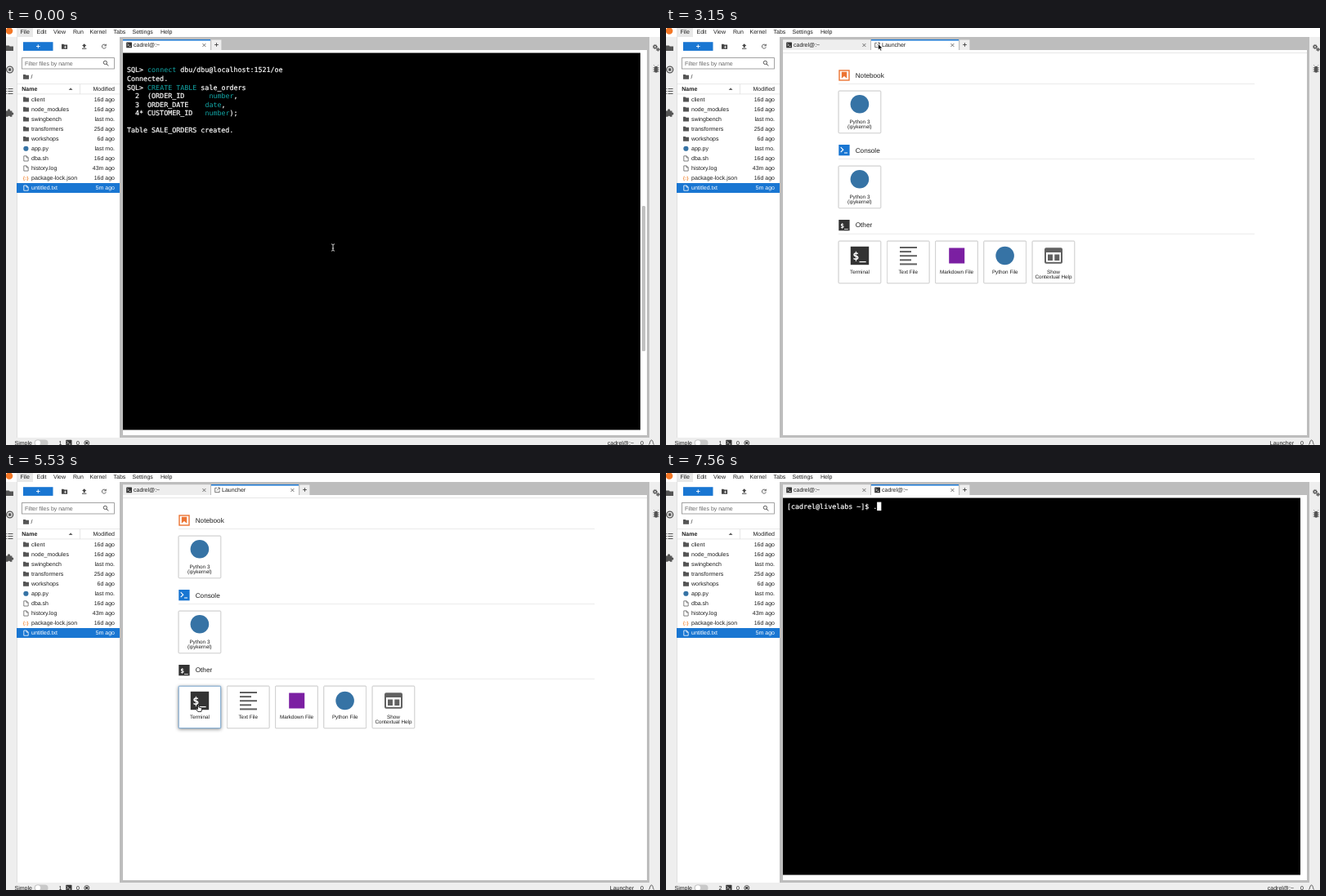
Write an HTML page that moves like this. It is 800x511 px and loops after 8000 ms.

```html
<!DOCTYPE html>
<html lang="en">
<head>
<meta charset="utf-8">
<title>Notebook workspace</title>
<style>
  html, body { margin: 0; width: 100%; height: 100%; overflow: hidden; background: #fff; }
  svg { display: block; width: 100vw; height: 100vh; }
  text { font: 7px "Liberation Sans", Arial, sans-serif; fill: #1c1c1c; white-space: pre; text-rendering: geometricPrecision; }
  .bold { font-weight: bold; }
  .end { text-anchor: end; }
  .mid { text-anchor: middle; }
  .head { font-size: 8.2px; }
  .label { font-size: 6.35px; text-anchor: middle; }
  .light { fill: #fff; }
  .hint { fill: #666; }
  .mono { font: 8.34px "DejaVu Sans Mono", monospace; fill: #fff; stroke: #fff; stroke-width: .2px; }
  .teal { fill: #12a5a5; stroke: none; }
  .glyph { font: bold 8px "DejaVu Sans Mono", monospace; fill: #fff; text-anchor: middle; }
  .line { fill: none; stroke: #555; stroke-width: 1; }
  .card { fill: #fff; stroke: #d4d4d4; stroke-width: .8; filter: drop-shadow(0 .7px .7px #0005); }
  .card.hover { stroke: #5a93c8; filter: drop-shadow(0 1.5px 2px #0007); }
</style>
</head>
<body>
<svg id="stage" viewBox="0 0 800 511" preserveAspectRatio="none"></svg>
<script>
const LOOP = 8000, TICK = 70;
const BLUE = '#1976d2', DARK = '#333', GREY = '#616161', DOCK = '#bdbdbd', PANEL = '#eee';
const USER = 'cadrel';
const COL = 5.02, ROW = 10.57;

const rect = (x, y, w, h, fill, more = '') => `<rect x="${x}" y="${y}" width="${w}" height="${h}" fill="${fill}" ${more}/>`;
const dot = (x, y, r, fill, more = '') => `<circle cx="${x}" cy="${y}" r="${r}" fill="${fill}" ${more}/>`;
const text = (x, y, s, cls = '', id = '') => `<text x="${x}" y="${y}" class="${cls}" id="${id}">${s}</text>`;
const path = (d, fill = GREY, more = '') => `<path d="${d}" fill="${fill}" ${more}/>`;
const line = (d, more = '') => `<path d="${d}" class="line" ${more}/>`;
const group = (id, body) => `<g id="${id}">${body}</g>`;
const mono = (col, row, s, cls = '') => text(148 + col * COL, 43.9 + row * ROW, s, 'mono ' + cls);

const folder = (x, y) => path(`M${x} ${y - 2.8}h2.7l.9.9h3.4v4.9h-7z`, '#555');
const page = (x, y, stroke) => line(`M${x} ${y - 3}h3.4l2 2v4.2h-5.4zM${x + 3.3} ${y - 3}v2.1h2.1`, `style="stroke:${stroke};stroke-width:.8"`);
const prompt = (x, y, s) => rect(x, y, s, s, DARK, 'rx=".6"') +
  line(`M${x + s * .2} ${y + s * .25}l${s * .22} ${s * .22}l${-s * .22} ${s * .22}M${x + s * .5} ${y + s * .72}h${s * .3}`, 'style="stroke:#fff;stroke-width:.8"');
const cross = (x, y) => line(`M${x - 2} ${y - 2}l4 4m0-4l-4 4`, 'style="stroke-width:.8"');
const plus = (x, y, stroke = '#444') => line(`M${x - 2.3} ${y}h4.6M${x} ${y - 2.3}v4.6`, `style="stroke:${stroke};stroke-width:.9"`);

function menuBar() {
  const items = [[17.5, 'File'], [37.5, 'Edit'], [58, 'View'], [82, 'Run'], [102.5, 'Kernel'], [131.5, 'Tabs'], [154.5, 'Settings'], [189, 'Help']];
  return dot(4, 3.5, 4.3, '#f37726') + rect(13, 0, 20, 11, '#e8e8e8') + items.map(([x, s]) => text(x, 7, s)).join('');
}

function sideBars() {
  const gear = (x, y, r) => dot(x, y, r, 'none', 'stroke="#555" stroke-width="1.3"') +
    dot(x, y, r + 1, 'none', 'stroke="#555" stroke-width="1" stroke-dasharray="1 1.1"');
  return rect(0, 11, 13, 500, PANEL) + rect(13, 11, .6, 491, '#ccc') + rect(787, 11, 13, 500, PANEL) +
    path('M0 21.5h3.7l1 1.1h4.3v5.4h-9z', '#555') +
    dot(4.7, 51, 3.9, 'none', 'stroke="#555" stroke-width="1.4"') + rect(3, 49.3, 3.4, 3.4, '#555') +
    line('M2.5 74.5h6M2.5 77.5h6M2.5 80.5h6M.3 74.5h1M.3 77.5h1M.3 80.5h1') +
    path('M0 101.5h2a1.6 1.6 0 1 1 3 0h2.4v2.1a1.5 1.5 0 1 1 0 2.9v2.3h-2.3a1.5 1.5 0 0 0-2.9 0h-2.2z', '#555') +
    gear(794, 23, 1.6) + gear(797.5, 26.3, 1) +
    path('M793 49a2.2 2.2 0 0 1 4.4 0v3.5a2.2 2.2 0 0 1-4.4 0z', '#555') +
    line('M791.6 48.7h7.2M791.6 51h7.2M791.6 53.3h7.2M793.4 46.4l-1-1M797 46.4l1-1', 'style="stroke-width:.8"');
}

function fileBrowser() {
  const files = [
    ['client', '16d ago'], ['node_modules', '16d ago'], ['swingbench', 'last mo.'], ['transformers', '25d ago'], ['workshops', '6d ago'],
    ['app.py', 'last mo.'], ['dba.sh', '16d ago'], ['history.log', '43m ago'], ['package-lock.json', '16d ago'], ['untitled.txt', '5m ago']
  ];
  const rows = files.map(([name, age], i) => {
    const y = 87.4 + i * 12.07, on = i === files.length - 1, cls = on ? 'light' : '';
    const icon = !name.includes('.') ? folder(21, y)
      : name.endsWith('.py') ? dot(24.4, y, 3.1, '#3673a5')
      : name.endsWith('.json') ? `<text x="20.8" y="${y + 2}" class="bold" style="font-size:6px;fill:#f08a3c">{:}</text>`
      : page(21.8, y, on ? '#fff' : GREY);
    return (on ? rect(13, y - 6, 126, 12, BLUE) : '') + icon + text(31, y + 2.4, name, cls) + text(133, y + 2.4, age, 'end ' + cls);
  }).join('');
  return rect(21, 17.2, 36.5, 10.7, BLUE) + plus(39.3, 22.5, '#fff') +
    path('M68 19.7h2.6l.9.9h3.6v5.2h-7.1z', '#444') + line('M71 23.3h3M72.5 21.8v3', 'style="stroke:#fff;stroke-width:.7"') +
    path('M95.7 19.2l2.7 2.8h-1.7v2h-2v-2h-1.7zM93 24.8h5.4v1h-5.4z', '#444') +
    line('M122 21.2a2.5 2.5 0 1 0 .3 2.2M122.4 19.7v2.1h-2.1', 'style="stroke-width:.9"') +
    rect(19.4, 36.6, 113, 13.4, '#fff', 'stroke="#8c8c8c" stroke-width=".8"') + text(23, 46, 'Filter files by name', 'hint') +
    dot(121.4, 42.4, 2.1, 'none', 'stroke="#444" stroke-width=".9"') + line('M123 44l2.4 2.4') +
    folder(21, 59.7) + text(30.5, 62.3, '/') +
    rect(13, 68.4, 126, .7, '#ddd') + rect(13, 80.6, 126, .7, '#ddd') + rect(90, 69, .7, 12, '#ddd') +
    text(19.3, 77.4, 'Name', 'bold') + path('M76.7 76l2.4-2.7 2.4 2.7z') + text(133, 77.4, 'Modified', 'end') + rows;
}

function tabFrame(x, active) {
  return rect(x, 14.2, 107, 12.8, active ? '#fff' : PANEL) + (active ? rect(x, 14, 107, 1.5, BLUE) : '') + cross(x + 99.4, 21);
}
const addTab = (x, id) => rect(x, 14.5, 12.2, 12.5, PANEL, `id="${id}"`) + plus(x + 6.3, 20.5);

function dock() {
  const card = (id, x, y) => rect(x, y, 51.5, 51.5, '#fff', `id="${id}" class="card" rx=".6"`);
  const heading = (y, s) => text(231.7, y + 2.8, s, 'head') + rect(211, y + 10.3, 509, .6, '#ddd');
  const kernel = (id, y) => card(id, 211.2, y) + dot(236.9, y + 16, 11.3, '#3673a5') +
    text(236.9, y + 39.7, 'Python 3', 'label') + text(236.9, y + 46.2, '(ipykernel)', 'label');
  const other = (id, i, ...lines) => {
    const x = 211.2 + i * 59.25;
    return card(id, x, 261.2) + lines.map((s, n) => text(x + 25.8, 300.9 + n * 6.5, s, 'label')).join('');
  };
  const launcher = rect(143, 30.2, 641, .7, '#ddd') +
    heading(58, 'Notebook') + rect(212, 52, 12, 12, '#fff', 'stroke="#ec7433" stroke-width="1.4"') + path('M214.8 53.8h6.4v8l-3.2-2.7-3.2 2.7z', '#ec7433') +
    heading(149.8, 'Console') + rect(211.3, 143, 13.3, 13.3, BLUE) + line('M213.7 146.2l3 3-3 3M218 153h4', 'style="stroke:#fff;stroke-width:1.2"') +
    heading(241.6, 'Other') + rect(211.3, 235, 13.3, 13.3, DARK) + text(218, 244.5, '$_', 'glyph') +
    kernel('card0', 77.2) + kernel('card1', 169.2) +
    other('card2', 0, 'Terminal') + rect(225.8, 267.8, 22.4, 22.4, DARK) +
    `<text x="236.5" y="283.5" class="glyph" style="font-size:13.5px">$_</text>` +
    other('card3', 1, 'Text File') + [0, 1, 2, 3, 4].map(i => rect(286, 268 + i * 5.1, i % 2 ? 14 : 21, 2, GREY)).join('') +
    other('card4', 2, 'Markdown File') + rect(346.2, 269.5, 19, 19, '#7b1fa2') +
    other('card5', 3, 'Python File') + dot(414.6, 279, 11.3, '#3673a5') +
    other('card6', 4, 'Show', 'Contextual Help') + rect(464, 270.2, 20, 17.6, 'none', 'rx="1" stroke="#616161" stroke-width="2"') +
    rect(464, 270, 20, 5, GREY) + rect(467, 277.5, 6, 7.5, GREY) + rect(475.3, 277.5, 6, 7.5, GREY);

  const sql = rect(777.8, 218, 4.4, 178, '#c1c1c1', 'rx="1.5"') +
    mono(0, 1, 'SQL&gt;') + mono(5, 1, 'connect', 'teal') + mono(13, 1, 'dbu/dbu@localhost:1521/oe') +
    mono(0, 2, 'Connected.') +
    mono(0, 3, 'SQL&gt;') + mono(5, 3, 'CREATE TABLE', 'teal') + mono(18, 3, 'sale_orders') +
    mono(2, 4, '2  (ORDER_ID') + mono(20, 4, 'number', 'teal') + mono(26, 4, ',') +
    mono(2, 5, '3  ORDER_DATE') + mono(19, 5, 'date', 'teal') + mono(23, 5, ',') +
    mono(2, 6, '4* CUSTOMER_ID') + mono(19, 6, 'number', 'teal') + mono(25, 6, ');') +
    mono(0, 8, 'Table SALE_ORDERS created.');

  return rect(139, 11, 648, 491, DOCK) + rect(143, 27, 641, 472, '#fff') +
    group('tabOneOn', tabFrame(143, true) + addTab(251.2, 'add')) +
    group('tabOneOff', tabFrame(143, false) + tabFrame(251, true) + addTab(359.2, 'addNext')) +
    prompt(147.2, 17.5, 6.8) + text(156, 23.3, USER + '@:~') +
    group('tabTwo', group('openIcon', line('M258 18.3h-2.3v5.4h5.4v-2.4M259 18h2.4v2.4M261.2 18.2l-3.2 3.2', 'style="stroke-width:.8"')) +
      group('termIcon', prompt(255.2, 17.5, 6.8)) + text(264, 23.3, '', '', 'title')) +
    group('screen', rect(143, 30.5, 633, 462, '#000')) +
    group('sql', sql) + group('launcher', launcher) +
    group('shell', text(148, 43.9, '', 'mono', 'shellLine') + rect(0, 35.6, 5.2, 10.5, '#fff', 'id="caret"'));
}

function statusBar() {
  return rect(0, 502, 800, 9, PANEL) + text(10.5, 511, 'Simple') +
    rect(34.5, 504.4, 17, 8, '#c8c8c8', 'rx="4"') + dot(39, 508.4, 3.6, '#fff', 'stroke="#aaa" stroke-width=".5"') +
    text(64.5, 511, '', '', 'sessions') + prompt(73.3, 504.8, 7.2) + text(86, 511, '0') +
    dot(98.8, 508.5, 3, 'none', 'stroke="#444" stroke-width=".9"') + rect(97.3, 507, 3, 3, '#444') +
    text(768, 511, '', 'end', 'status') + text(776, 511, '0') +
    line('M786.5 510.5c1.3-1 1-5.3 3-5.5s1.8 4.5 3 5.5');
}

function pointer() {
  return group('pointer',
    group('beam', line('M-2-4.2q2 0 2 1.4v5.6q0 1.4-2 1.4M2-4.2q-2 0-2 1.4M2 4.2q-2 0-2-1.4M-1.2 1h2.4', 'style="stroke:#ccc;stroke-width:1"')) +
    group('arrow', path('M0 0v7.4l1.7-1.5 1.1 2.6 1.3-.6-1.1-2.5h2.3z', '#000', 'stroke="#fff" stroke-width=".6"')) +
    group('hand', path('M-.6 0q.8-.7 1.5 0v3l3.1.8q.8.4.6 1.4l-.7 3.2h-4.2l-2.3-3.2q.2-1 1.3-.3l.7.6z', '#fff', 'stroke="#000" stroke-width=".8"')));
}

const stage = document.getElementById('stage');
stage.innerHTML = rect(0, 0, 800, 511, '#fff') + menuBar() + sideBars() + fileBrowser() + dock() + statusBar() + pointer();

const $ = id => document.getElementById(id);
const show = (id, on) => { $(id).style.display = on ? '' : 'none'; };
const write = (id, s) => { if ($(id).textContent !== s) $(id).textContent = s; };

// Pointer stops: time, x, y
const STOPS = [
  [0, 400, 269], [630, 400, 269], [1400, 262, 191], [1750, 261, 21], [1890, 259.6, 19.4], [4060, 259.6, 19.4],
  [5530, 235, 284], [5670, 235, 284], [6440, 262, 214], [6580, 262, 194], [6860, 262, 104], [LOOP, 262, 104]
];
const ease = p => p * p * (3 - 2 * p);

function pointerAt(t) {
  const i = STOPS.findIndex(s => s[0] > t);
  const [t0, x0, y0] = STOPS[i - 1], [t1, x1, y1] = STOPS[i];
  const p = ease((t - t0) / (t1 - t0));
  return [x0 + (x1 - x0) * p, y0 + (y1 - y0) * p];
}

function draw(t) {
  const launched = t >= 3150, opened = t >= 5670, ready = t >= 5950, typed = t >= 7350;
  const launcher = launched && !opened;
  const [x, y] = pointerAt(t);

  show('tabOneOn', !launched);
  show('tabOneOff', launched);
  show('tabTwo', launched);
  show('openIcon', launcher);
  show('termIcon', opened);
  show('screen', !launcher);
  show('sql', !launched);
  show('launcher', launcher);
  show('shell', opened);

  const title = ready ? USER + '@:~' : opened ? 'Terminal' : 'Launcher';
  write('title', title);
  write('status', launched ? title : USER + '@:~');
  write('sessions', opened ? '2' : '1');

  const shellLine = ready ? `[${USER}@livelabs ~]$ ` + (typed ? '.' : '') : '';
  write('shellLine', shellLine);
  $('caret').setAttribute('x', 147.7 + shellLine.length * COL);
  show('caret', t < 6510 || t >= 7070);

  let onCard = false;
  [77.2, 169.2, 261.2].forEach((top, i) => {
    const hover = launcher && x > 211 && x < 263 && y > top && y < top + 51.5;
    $('card' + i).classList.toggle('hover', hover);
    onCard = onCard || hover;
  });
  $('add').setAttribute('fill', y < 27 ? '#fff' : PANEL);

  const beam = !launcher && y > 30.5;
  show('pointer', !typed);
  show('beam', beam);
  show('hand', onCard);
  show('arrow', !beam && !onCard);
  $('pointer').setAttribute('transform', `translate(${x} ${y})`);
}

const start = performance.now();
function frame() {
  const t = (performance.now() - start) % LOOP;
  draw(Math.floor(t / TICK) * TICK);
  requestAnimationFrame(frame);
}
frame();
</script>
</body>
</html>
```
